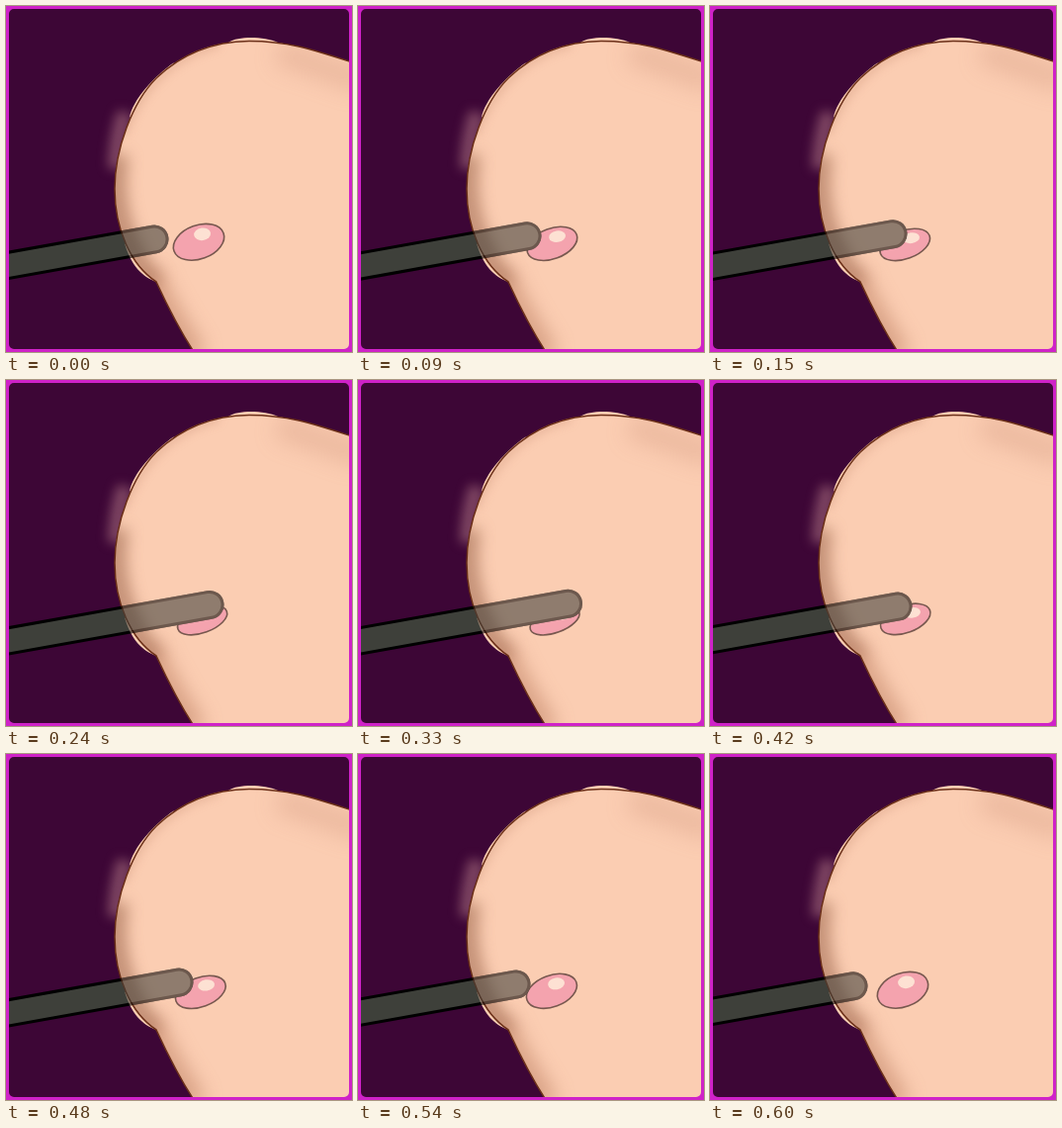
Write an HTML page with a canvas that moves like this. It is 350 px wide and 350 px high and loops after 0.63 s.

```html
<!DOCTYPE html>
<html lang="en">
<head>
<meta charset="utf-8">
<style>
  html, body { margin: 0; width: 100%; height: 100%; overflow: hidden; background: #3d0636; }
  canvas { display: block; width: 350px; height: 350px; }
</style>
</head>
<body>
<canvas id="stage" width="350" height="350"></canvas>
<script>
const SIZE = 350, STEP = 30, STEPS = 21, TURN = 10;
const ctx = document.getElementById('stage').getContext('2d');

const edge = 'M350 57 C310 44 285 35.5 246 35.5 C205 36 176 50 152 73 ' +
  'C128 97 110 145 110 185 C110 225 126 262 152 279 C158 292 172 322 190 350';
const outline = new Path2D(edge);
const body = new Path2D(edge + ' L350 350 Z');
const fringe = new Path2D('M125 113 C128 95 150 71 170 57 Z ' +
  'M225 37 C235 30 262 31 275 37 Z M120 240 C126 262 138 274 152 279 Z');

function softLine(c, d, color, width, blur) {
  c.save();
  c.filter = `blur(${blur}px)`;
  c.strokeStyle = color;
  c.lineWidth = width;
  c.stroke(new Path2D(d));
  c.restore();
}

// The skin never changes, so it is painted once.
function paintSkin() {
  const layer = document.createElement('canvas');
  layer.width = layer.height = SIZE;
  const c = layer.getContext('2d');
  softLine(c, 'M121 108 C114 125 112 145 111 165', 'rgba(225,165,165,.42)', 16, 6);
  c.fillStyle = '#fbcdb2';
  c.fill(fringe);
  c.fill(body);
  c.save();
  c.clip(body);
  softLine(c, 'M114 150 C104 195 120 250 152 281', 'rgba(150,95,70,.6)', 20, 8);
  softLine(c, 'M146 272 C156 296 172 324 192 355', 'rgba(175,110,80,.5)', 22, 10);
  softLine(c, 'M275 47 C305 56 330 66 360 76', 'rgba(190,125,100,.25)', 24, 11);
  softLine(c, 'M118 130 C132 88 165 50 215 38', 'rgba(190,125,100,.28)', 9, 5);
  c.restore();
  c.strokeStyle = '#6b2f18';
  c.lineWidth = 1.5;
  c.stroke(outline);
  return layer;
}

const skin = paintSkin();
const mix = (a, b, p) => a + (b - a) * p;

function oval(x, y, rx, ry, turn, fill) {
  ctx.beginPath();
  ctx.ellipse(x, y, rx, ry, turn, 0, Math.PI * 2);
  ctx.fillStyle = fill;
  ctx.fill();
}

function drawBean(p) {
  oval(mix(195, 199.5, p), mix(238.8, 244, p), mix(26.6, 26.2, p), mix(17, 11.5, p), -0.35, '#f4a3ae');
  ctx.strokeStyle = '#78584f';
  ctx.lineWidth = 1.6;
  ctx.stroke();
  oval(mix(198.6, 208.5, p), mix(230.8, 238.5, p), 8.5, mix(6.3, 4.5, p), -0.15, '#fde1d3');
}

function rodPath(x, y, r) {
  const slope = -0.179;
  const path = new Path2D();
  const cap = new Path2D();
  cap.moveTo(-260, -r);
  cap.lineTo(0, -r);
  cap.arc(0, 0, r, -Math.PI / 2, Math.PI / 2);
  cap.lineTo(-260, r);
  cap.closePath();
  path.addPath(cap, new DOMMatrix().translate(x, y).rotate(Math.atan(slope) * 180 / Math.PI));
  return path;
}

function drawRod(x, y) {
  const rod = rodPath(x, y, 13);
  ctx.fillStyle = '#3e403a';
  ctx.fill(rod);
  ctx.strokeStyle = '#000';
  ctx.lineWidth = 3;
  ctx.stroke(rod);
  // Skin shows faintly over the rod.
  ctx.save();
  ctx.clip(rodPath(x, y, 14.5));
  ctx.globalAlpha = 0.43;
  ctx.drawImage(skin, 0, 0);
  ctx.restore();
}

function drawFrame() {
  ctx.beginPath();
  ctx.rect(0, 0, SIZE, SIZE);
  ctx.roundRect(3, 3, 344, 344, 5);
  ctx.fillStyle = '#cf22c8';
  ctx.fill('evenodd');
}

function draw(step) {
  const going = step <= TURN;
  const p = going ? step / TURN : (2 * TURN - step) / TURN;
  ctx.fillStyle = '#3d0636';
  ctx.fillRect(0, 0, SIZE, SIZE);
  ctx.drawImage(skin, 0, 0);
  drawBean(p);
  drawRod(mix(going ? 150 : 145, 220, p), mix(going ? 236 : 234.8, 225.3, p));
  drawFrame();
}

const start = performance.now();
function tick() {
  draw(Math.floor((performance.now() - start) / STEP) % STEPS);
  requestAnimationFrame(tick);
}
tick();
</script>
</body>
</html>
```
